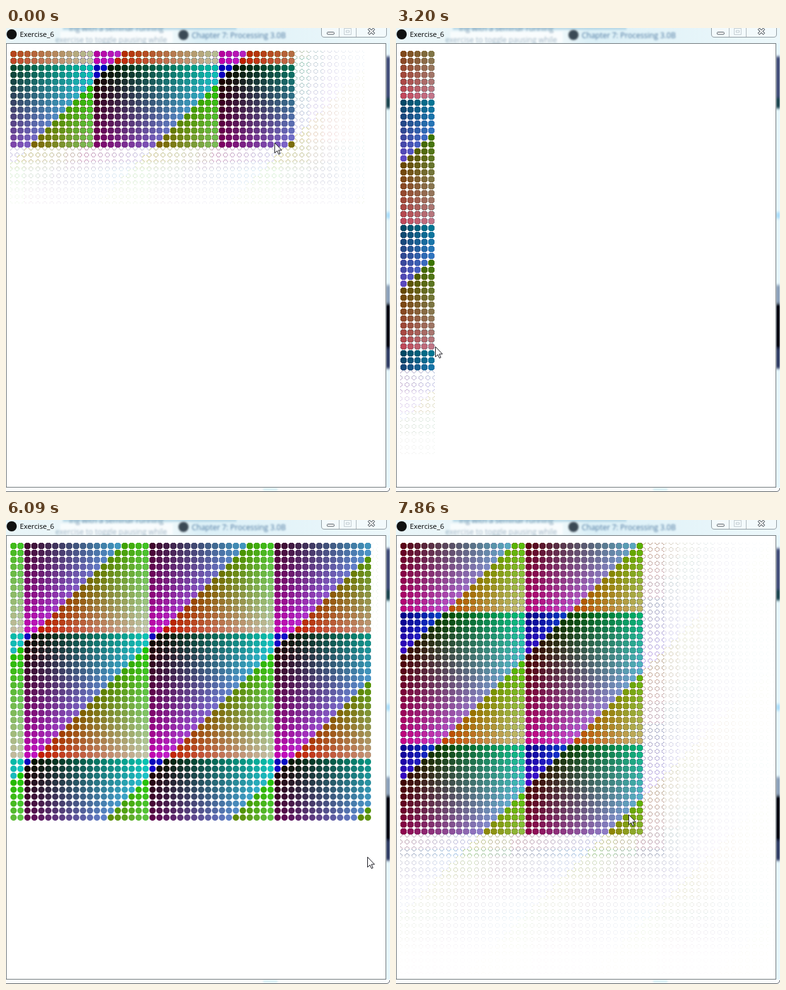
Write an HTML page with a canvas that moves like this. It is 608 px wide and 733 px high and loops after 8000 ms.

```html
<!DOCTYPE html>
<html lang="en">
<head>
<meta charset="utf-8">
<title>Exercise_6</title>
<style>
html, body { margin: 0; width: 100%; height: 100%; overflow: hidden; background: #fff; }
svg, canvas { position: absolute; left: 0; top: 0; width: 608px; height: 733px; }
text { font-family: "Open Sans", "Noto Sans", sans-serif; }
</style>
</head>
<body>
<svg viewBox="0 0 608 733">
  <defs>
    <filter id="soft" x="-20%" y="-60%" width="140%" height="220%"><feGaussianBlur stdDeviation="1.7"/></filter>
    <filter id="rise" x="0" width="1"><feGaussianBlur stdDeviation="0 2"/></filter>
    <linearGradient id="bar">
      <stop offset="0" stop-color="#e9f5f8"/><stop offset=".44" stop-color="#ecf7fa"/>
      <stop offset=".5" stop-color="#dcf0f7"/><stop offset="1" stop-color="#edf8fb"/>
    </linearGradient>
  </defs>
  <rect width="608" height="733" fill="#fdfefe"/>
  <rect width="608" height="24" fill="url(#bar)"/>
  <rect x="86" y="6" width="178" height="17" fill="#fff" opacity=".7" filter="url(#soft)"/>
  <rect x="90" y="-4" width="275" height="7" fill="#9fc9de" opacity=".6" filter="url(#soft)"/>
  <g filter="url(#soft)" fill="#5c7f9c" font-size="12">
    <text x="100" y="5" opacity=".8">ing with a seminar running</text>
    <text x="78" y="23" opacity=".6">exercise to toggle pausing while</text>
    <text x="294" y="16" fill="#47739c">Chapter 7: Processing 3.0B</text>
    <circle cx="281" cy="11" r="8" fill="#3b4854"/>
  </g>
  <rect x="602" y="24" width="6" height="702" fill="#e6f6fc"/>
  <g filter="url(#rise)">
    <rect x="602" y="45" width="6" height="82" fill="#3f4b77"/>
    <rect x="602" y="110" width="6" height="17" fill="#1d4450"/>
    <rect x="602" y="291" width="6" height="10" fill="#a9dcfa"/>
    <rect x="602" y="406" width="6" height="30" fill="#8a9fb8"/>
    <rect x="602" y="435" width="6" height="72" fill="#05060a"/>
    <rect x="602" y="506" width="6" height="32" fill="#2e3b64"/>
  </g>
  <path d="M602.5 24V726M607.5 24V726" stroke="#f0fafd" opacity=".5"/>
  <rect x="407" y="727" width="23" height="4" fill="#d5f0f5" filter="url(#soft)"/>
  <rect x=".5" y="24.5" width="601" height="701" fill="#fff" stroke="#6c7478"/>
  <path d="M0 732.5H602Q607.5 732 607.5 727" fill="none" stroke="#565c60"/>
  <circle cx="9" cy="10" r="8" fill="#111"/>
  <text x="22" y="14" font-size="11.3">Exercise_6</text>
  <g fill="none" stroke="#8e999f">
    <path d="M499.5 0V10Q499.5 14.5 504 14.5H598Q602.5 14.5 602.5 10V0" fill="#f3fafc"/>
    <path d="M527.5 0V14M554.5 0V14" stroke="#adb7bc"/>
    <rect x="508.5" y="6.5" width="11" height="3.5" rx="1" fill="#fff" stroke="#4c555c"/>
    <path d="M535.5 .5H546.5V10.5H535.5ZM538.5 4H543.5V7H538.5Z" stroke="#c2cbd0"/>
    <path d="M574 1L583 9.5M583 1L574 9.5" stroke="#4c555c" stroke-width="4"/>
    <path d="M574.5 1.5L582.5 9M582.5 1.5L574.5 9" stroke="#fff" stroke-width="2"/>
  </g>
</svg>
<canvas id="dots" width="608" height="733"></canvas>
<svg viewBox="0 0 608 733">
  <path id="cursor" d="M.5 .5V16.5L4.3 13L6.7 18.5L9 17.5L6.6 12H11.5Z" fill="#fff" stroke="#14141c"/>
</svg>
<script>
const W = 608, H = 733, LOOP = 8000;
const FIRST = 120, STEP = 138.6, LAST = 56;   // screen refreshes
const LAG = 0.72, TICK = 0.75, DEPTH = 9;     // sketch redraws, in refreshes
const GAP = 11, R = 5, X0 = 12, Y0 = 41, COLS = 54, ROWS = 62;
const LEFT = 1, TOP = 25, WRAP = 200;
const WHITE = [255, 255, 255];

// Pointer path: refresh, x, y
const path = [
  [-4.5, 570, 275], [-0.72, 460, 190], [0, 425, 181], [2.6, 240, 150],
  [5.28, 161, 158], [6, 143, 170], [9, 94, 290], [16.28, 62, 579],
  [17, 62, 600], [19, 66, 690], [23.5, 62, 480], [26.5, 110, 72],
  [30.28, 472, 70], [31, 506, 69], [33.5, 592, 78], [39.5, 586, 215],
  [43.28, 576, 474], [44, 572, 532], [46, 599, 674], [48.9, 599, 674],
  [49.28, 590.5, 721.5], [50, 590, 723], [55.28, 394, 499.5], [56, 368, 465]
];

const ctx = document.getElementById('dots').getContext('2d');
const cursor = document.getElementById('cursor');

function pointer(u) {
  let i = 1;
  while (i < path.length - 1 && path[i][0] < u) i++;
  const [u0, x0, y0] = path[i - 1], [u1, x1, y1] = path[i];
  const p = Math.min(1, Math.max(0, (u - u0) / (u1 - u0)));
  return { x: x0 + (x1 - x0) * p, y: y0 + (y1 - y0) * p };
}

// Share of a pixel that lies inside the disc
function coverage(px, py) {
  const n = 16;
  let hits = 0;
  for (let k = 0; k < n * n; k++) {
    const x = px + (k % n + 0.5) / n, y = py + (Math.floor(k / n) + 0.5) / n;
    if (x * x + y * y < R * R) hits++;
  }
  return hits / (n * n);
}

// One quarter of the disc, mirrored when painted
const quarter = [];
for (let k = 0; k < R * R; k++) {
  const x = k % R, y = Math.floor(k / R), cover = coverage(x, y);
  if (cover > 0.02) quarter.push({ x, y, cover });
}

function color(x, y, m) {
  if (x >= m.x || y >= m.y) return WHITE;
  const sx = x - LEFT, sy = y - TOP;
  return [(sy + m.y - TOP) % WRAP, (sx + m.x - LEFT) % WRAP, (sx + sy) % WRAP];
}

// Discs are painted over one another, so soft edge pixels keep older colours
function blend(history, cover) {
  const mix = [...history[DEPTH]];
  for (let k = DEPTH - 1; k >= 0; k--) {
    for (let c = 0; c < 3; c++) mix[c] += (history[k][c] - mix[c]) * cover;
  }
  return mix;
}

function put(data, x, y, [r, g, b]) {
  const o = (y * W + x) * 4;
  data[o] = r;
  data[o + 1] = g;
  data[o + 2] = b;
  data[o + 3] = 255;
}

function draw(u) {
  const mice = [];
  for (let k = 0; k <= DEPTH; k++) mice.push(pointer(u - LAG - k * TICK));
  const image = ctx.createImageData(W, H);
  for (let j = 0; j < ROWS; j++) {
    for (let i = 0; i < COLS; i++) {
      const x = X0 + i * GAP, y = Y0 + j * GAP;
      const history = mice.map(m => color(x, y, m));
      if (history.every(c => c === WHITE)) continue;
      for (const q of quarter) {
        const c = q.cover === 1 ? history[0] : blend(history, q.cover);
        for (const px of [x + q.x, x - 1 - q.x]) {
          put(image.data, px, y + q.y, c);
          put(image.data, px, y - 1 - q.y, c);
        }
      }
    }
  }
  ctx.putImageData(image, 0, 0);
  const p = pointer(u);
  cursor.setAttribute('transform', `translate(${Math.round(p.x)} ${Math.round(p.y)})`);
}

let shown = -1;
const start = performance.now();
function frame() {
  const t = (performance.now() - start) % LOOP;
  const u = Math.min(LAST, 1 + Math.floor((t - FIRST) / STEP));
  if (u !== shown) draw(shown = u);
  requestAnimationFrame(frame);
}
frame();
</script>
</body>
</html>
```
